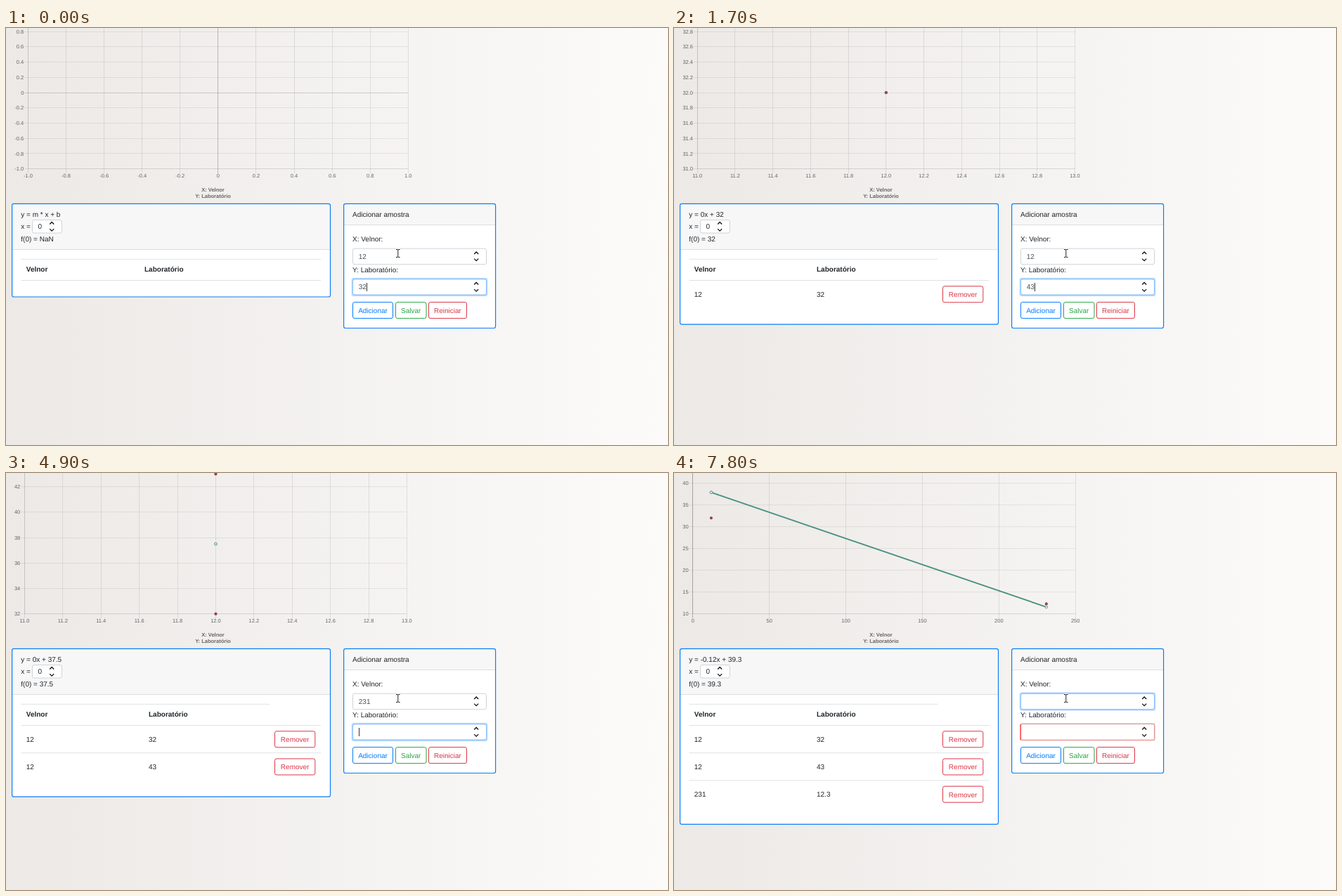
An HTML page that plays this animation: 942 px wide and 594 px high, repeating every 8 s.

```html
<!DOCTYPE html>
<html lang="pt">
<head>
<meta charset="utf-8">
<title>Regressão linear</title>
<style>
html, body { margin: 0; width: 100%; height: 100%; overflow: hidden; }
body { background: linear-gradient(to right, #ece9e6, #fcfbfa); }
svg { display: block; font: 10px "Liberation Sans", Arial, sans-serif; fill: #212529; text-rendering: geometricPrecision; }
.small { font-size: 7.5px; fill: #666; }
.bold { font-weight: bold; }
.mid { text-anchor: middle; }
.end { text-anchor: end; }
.grid { shape-rendering: crispEdges; }
</style>
</head>
<body>
<svg id="stage" width="942" height="594" viewBox="0 0 942 594"></svg>
<script>
const LOOP = 8000;
const NAME_X = 'Velnor', NAME_Y = 'Laboratório';
const TOP = -16.7, BOTTOM = 200.7;
const BLUE = '#007bff', GREEN = '#28a745', RED = '#dc3545', TEAL = '#4a9184';
const samples = [[12, 32], [12, 43], [231, 12.3]];

// One chart and model per number of samples
const models = [
  { eq: 'm * x + b', at0: 'NaN', left: 31.5, right: 572.3, x: [-1, 1, .2, 1], y: [-1, 1, .2, 1] },
  { eq: '0x + 32', at0: 32, m: 0, b: 32, left: 33.2, right: 570.5, x: [11, 13, .2, 1], y: [31, 33, .2, 1] },
  { eq: '0x + 37.5', at0: 37.5, m: 0, b: 37.5, left: 26.5, right: 570.4, x: [11, 13, .2, 1], y: [32, 44, 2, 0] },
  { eq: '-0.12x + 39.3', at0: 39.3, m: -.12, b: 39.3, left: 26.8, right: 571.2, x: [0, 250, 50, 0], y: [10, 45, 5, 0] }
];

// Time and value from that time on; focus runs from X (0) to Y (1)
const tracks = {
  count: [[0, 0], [300, 1], [2400, 2], [6600, 3]],
  x: [[0, '12'], [300, ''], [900, '12'], [2400, ''], [3300, '2'], [3500, '23'], [4400, '231'], [6600, '']],
  y: [[0, '32'], [300, ''], [1700, '43'], [2400, ''], [5500, '12'], [5800, '12.'], [6100, '12.3'], [6600, '']],
  caret: [[0, 'y'], [100, ''], [300, 'x'], [1300, 'y'], [2400, 'x'], [3000, ''], [3500, 'x'], [3600, ''],
    [4700, 'y'], [5900, ''], [6600, 'x'], [7800, '']],
  focus: [[0, 1], [300, 0], [1300, .5], [1400, 1], [2500, .2], [3000, 0], [4800, .5], [4900, 1], [6700, .5], [6800, 0]]
};

const valueAt = (track, t) => track.filter(([start]) => start <= t).pop()[1];
const text = (x, y, s, cls = '', fill = '') =>
  `<text x="${x}" y="${y}" class="${cls}"${fill && ` style="fill:${fill}"`}>${s}</text>`;
const rect = (x, y, w, h, attrs) => `<rect x="${x}" y="${y}" width="${w}" height="${h}" ${attrs}/>`;
const line = (x1, y1, x2, y2, stroke, attrs = '') =>
  `<path d="M${x1} ${y1}L${x2} ${y2}" stroke="${stroke}" ${attrs}/>`;
const box = (x, y, w, h, stroke, fill = '#fff', attrs = '') =>
  rect(x, y, w, h, `rx="2.5" fill="${fill}" stroke="${stroke}" ${attrs}`);
const button = (x, y, w, label, color) =>
  box(x, y, w, 23, color) + text(x + w / 2, y + 15.3, label, 'mid', color);
const spinner = (x, y) =>
  `<path d="M${x - 3} ${y - 3.2}l3 -3l3 3M${x - 3} ${y + 3.4}l3 3l3 -3" fill="none" stroke="#111" stroke-width="1.3"/>`;

function chart(n) {
  const c = models[n];
  const px = v => c.left + (v - c.x[0]) / (c.x[1] - c.x[0]) * (c.right - c.left);
  const py = v => BOTTOM - (v - c.y[0]) / (c.y[1] - c.y[0]) * (BOTTOM - TOP);
  const ticks = ([lo, hi, step, digits]) =>
    Array.from({ length: Math.round((hi - lo) / step) + 1 }, (_, i) => {
      const v = +(lo + i * step).toFixed(2);
      return [v, v ? v.toFixed(digits) : '0'];
    });
  const ink = v => `rgba(0,0,0,${v ? .09 : .24})`;
  let grid = '', labels = '';
  for (const [v, s] of ticks(c.x)) {
    grid += line(px(v), TOP, px(v), BOTTOM + 6, ink(v));
    labels += text(px(v), 213.3, s, 'small mid');
  }
  for (const [v, s] of ticks(c.y)) {
    grid += line(c.left - 6, py(v), c.right, py(v), v ? 'rgba(0,0,0,.07)' : 'rgba(0,0,0,.16)');
    labels += text(c.left - 6.2, py(v) + 2.6, s, 'small end');
  }
  grid += line(c.left, TOP, c.left, BOTTOM, ink(1)) + line(c.left, BOTTOM, c.right, BOTTOM, 'rgba(0,0,0,.06)');

  let marks = '';
  if (n) {
    const used = samples.slice(0, n);
    const fit = used.map(([x]) => [px(x), py(c.m * x + c.b)]);
    if (n > 2) marks += line(...fit[0], ...fit[n - 1], TEAL, 'stroke-width="1.9"');
    for (const [x, y] of fit.slice(n - 2))
      marks += `<circle cx="${x}" cy="${y}" r="1.8" fill="#eeecea" stroke="${TEAL}" stroke-width=".8"/>`;
    if (n > 2) marks += `<circle cx="${fit[0][0]}" cy="${fit[0][1]}" r="1.8" fill="#eeecea" stroke="${TEAL}" stroke-width=".8"/>`;
    for (const [x, y] of used)
      marks += `<circle cx="${px(x)}" cy="${py(y)}" r="2.1" fill="#91444a"/>`;
  }
  return `<g class="grid">${grid}</g>${labels}${marks}` +
    text(294.5, 232.8, 'X: ' + NAME_X, 'small bold mid') + text(294.5, 242, 'Y: ' + NAME_Y, 'small bold mid');
}

const card = (x, w, bottom, head) =>
  rect(x, 250.3, w, bottom - 250.3, 'rx="2.5" fill="#fff"') +
  rect(x, 250.3, w, head - 250.3, 'rx="2" fill="#f7f7f7"') +
  line(x, head, x + w, head, '#dfdfdf') +
  box(x, 250.3, w, bottom - 250.3, '#0a7ff5', 'none', 'stroke-width="1.2"');

function table(n) {
  const { eq, at0 } = models[n];
  const col = n ? 203 : 197;
  let out = card(8.6, 452.9, 383 + 39.1 * n, 315.5) +
    text(21.3, 269.2, 'y = ' + eq) + text(21.3, 286, 'x =') + text(21.3, 303.5, `f(0) = ${at0}`) +
    box(37.5, 273.5, 42, 18.5, '#ced4da') + text(45.5, 286, '0') + spinner(65.2, 282.7) +
    line(21.5, 329.3, n ? 375 : 448, 329.3, '#dee2e6') + line(21.5, 359.5, 448, 359.5, '#dee2e6', 'stroke-width="1.2"') +
    text(28.8, 347.2, NAME_X, 'bold') + text(col, 347.2, NAME_Y, 'bold');
  samples.slice(0, n).forEach(([x, y], i) => {
    const top = 359.5 + 39.2 * i;
    if (i) out += line(21.5, top, 448, top, '#dee2e6');
    out += text(28.8, top + 23.5, x) + text(col, top + 23.5, y) + button(382.5, top + 8.3, 57.3, 'Remover', RED);
  });
  return out;
}

function field(y, value, glow, caret, invalid) {
  const width = [...value].reduce((w, ch) => w + (ch === '.' ? 2.78 : 5.56), 0);
  let out = box(493.5, y, 190, 22.5, '#ced4da');
  if (invalid) out += `<g opacity="${invalid}">` +
    box(493, y - .5, 191, 23.5, '#ff0000', 'none', 'stroke-width="1.8" stroke-opacity=".28"') +
    line(493.2, y + .5, 493.2, y + 22.5, '#ff5a5a', 'stroke-width="1.7"') + '</g>';
  if (glow) out += `<g opacity="${glow}">` +
    box(492.5, y - 1, 192, 24.5, BLUE, 'none', 'stroke-width="2" stroke-opacity=".25"') +
    box(493.5, y, 190, 22.5, '#80bdff', 'none') + '</g>';
  out += text(501.8, y + 14.5, value, '', '#495057') + spinner(669.2, y + 11);
  if (caret) out += rect(Math.round(502 + width), Math.round(y + 5), 1, 12, 'fill="#333"');
  return out;
}

const form = s => card(480.6, 216, 427.5, 280.5) +
  text(493, 269.2, 'Adicionar amostra') +
  text(493, 304.3, `X: ${NAME_X}:`) + field(314.2, s.x, 1 - s.focus, s.caret === 'x', 0) +
  text(493, 348.2, `Y: ${NAME_Y}:`) + field(357.7, s.y, s.focus, s.caret === 'y', s.y ? 0 : 1 - s.focus) +
  button(493.5, 390.6, 57, 'Adicionar', BLUE) + button(554.5, 390.6, 43.5, 'Salvar', GREEN) +
  button(601.5, 390.6, 54, 'Reiniciar', RED);

const beam = 'M555 315.5h2l.8 .6l.8 -.6h2M557.8 316v10M555 326.6h2l.8 -.6l.8 .6h2';
const pointer = `<path d="${beam}" fill="none" stroke="#fff" stroke-width="2.6"/>` +
  `<path d="${beam}" fill="none" stroke="#222"/>`;

const stage = document.getElementById('stage');
let shown = '';
function draw(now) {
  const t = now % LOOP, state = {};
  for (const key in tracks) state[key] = valueAt(tracks[key], t);
  const key = JSON.stringify(state);
  if (key !== shown) {
    shown = key;
    stage.innerHTML = chart(state.count) + table(state.count) + form(state) + pointer;
  }
  requestAnimationFrame(draw);
}
draw(0);
</script>
</body>
</html>
```
